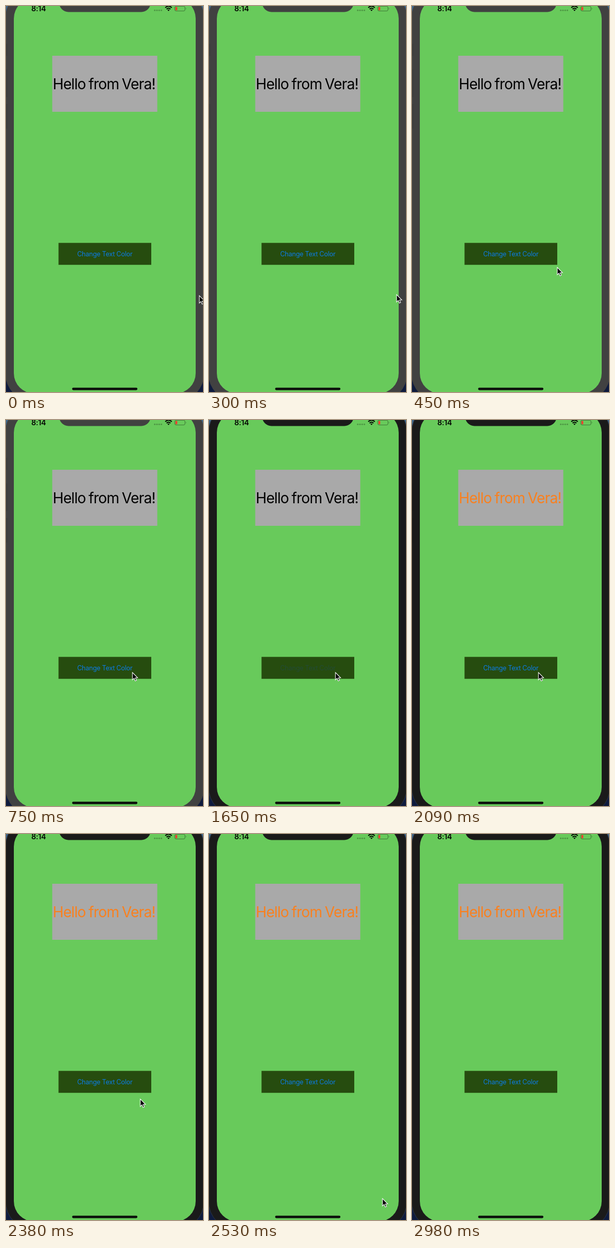
An HTML page that plays this animation: 377x737 px, repeating every 3.43 s.

```html
<!DOCTYPE html>
<html lang="en">
<head>
<meta charset="utf-8">
<title>Change text color</title>
<style>
html, body { margin: 0; width: 100%; height: 100%; overflow: hidden; }
svg { display: block; width: 377px; height: 737px; }
text { font-family: Inter, "Liberation Sans", sans-serif; }
#label { font-size: 28px; letter-spacing: -0.9px; word-spacing: -1.5px; }
#action { font-size: 12.5px; letter-spacing: -0.25px; }
#clock { font-size: 14px; font-weight: 600; letter-spacing: -0.2px; }
</style>
</head>
<body>
<svg viewBox="0 0 377 737">
  <defs>
    <linearGradient id="desk" x1="0" y1="0" x2="0" y2="1">
      <stop offset="0" stop-color="#41698c"/>
      <stop offset="0.05" stop-color="#24426a"/>
      <stop offset="1" stop-color="#0e1a3d"/>
    </linearGradient>
  </defs>
  <rect width="377" height="737" fill="url(#desk)"/>
  <rect id="bezel" x="-1" y="-31" width="380" height="787" rx="55"/>
  <path d="M1.5 72V95M1.5 121V174M1.5 187V234" stroke="#000" stroke-opacity="0.15"/>
  <rect x="15" y="-15" width="348" height="755" rx="39" fill="#68ca5b"/>
  <path id="notch" d="M101.500 -7A18 18.500 0 0 0 119.500 11.500H259A18 18.500 0 0 0 277 -7Z"/>

  <text id="clock" x="48.500" y="10">8:14</text>
  <g fill="#000" fill-opacity="0.26">
    <circle cx="284.700" cy="8.300" r="1.500"/>
    <circle cx="288.900" cy="8.300" r="1.500"/>
    <circle cx="293.100" cy="8.300" r="1.500"/>
    <circle cx="297.300" cy="8.300" r="1.500"/>
  </g>
  <g fill="none" stroke="#000" stroke-width="2">
    <path d="M304.800 3.200Q311 -2.600 317.200 3.200M307.300 5.900Q311 2.500 314.700 5.900"/>
    <path d="M309 7.600Q311 6 313 7.600L311 9.700Z" fill="#000" stroke="none"/>
  </g>
  <rect x="323" y="0.500" width="19.500" height="9" rx="2.500" fill="none" stroke="#000" stroke-opacity="0.4"/>
  <path d="M344 3.300Q345.600 5 344 6.700Z" fill="#000" fill-opacity="0.45"/>
  <rect x="324.300" y="1.800" width="3.400" height="6.400" rx="1" fill="#f03c2e"/>

  <rect x="88.500" y="95" width="201" height="107" fill="#a9a9a9"/>
  <text id="label" x="89.500" y="159">Hello from Vera!</text>
  <rect x="100.500" y="452.300" width="177.500" height="41.900" fill="#264c0f"/>
  <text id="action" x="189.100" y="477.800" text-anchor="middle">Change Text Color</text>
  <rect x="126.500" y="728.800" width="125" height="4.600" rx="2.300" fill="#0c100b"/>

  <g id="cursor">
    <path d="M1 1V15.200L4.200 12.200L6.300 17.200L8.700 16.200L6.600 11.300H11Z" fill="#000" fill-opacity="0.2" transform="translate(0.500 1.200)"/>
    <path d="M1 1V15.200L4.200 12.200L6.300 17.200L8.700 16.200L6.600 11.300H11Z" stroke="#fff" stroke-width="1.100"/>
  </g>
</svg>
<script>
const LOOP = 3430;
const PRESS = 1650, RELEASE = 1800;
const DIM = [35, 75, 53], BLUE = [12, 123, 228];

// [start time, x, y]: the pointer jumps between samples
const pointer = [
  [0, 369, 552], [300, 358, 550], [450, 277, 498], [600, 244, 482],
  [750, 241, 481], [2380, 256, 505], [2530, 331, 695], [2830, 324, 726],
  [2980, 400, 760]
];
// [start time, brightness of the button title]
const glow = [[0, 1], [PRESS, 0], [RELEASE, 0.35], [1940, 0.8], [2090, 1]];

const el = id => document.getElementById(id);
const [bezel, notch, label, action, cursor] =
  ["bezel", "notch", "label", "action", "cursor"].map(el);

const at = (steps, t) => steps.filter(s => s[0] <= t).pop().slice(1);
const mix = (a, b, k) => `rgb(${a.map((v, i) => Math.round(v + (b[i] - v) * k))})`;

function draw(t) {
  const shell = t < PRESS ? "#414141" : "#1a1a1a";
  bezel.setAttribute("fill", shell);
  bezel.setAttribute("stroke", t < PRESS ? "#414141" : "#2b3547");
  notch.setAttribute("fill", shell);
  label.setAttribute("fill", t < RELEASE ? "#000" : "#f9801f");
  action.setAttribute("fill", mix(DIM, BLUE, at(glow, t)[0]));
  cursor.setAttribute("transform", `translate(${at(pointer, t)})`);
}

const start = performance.now();
function tick() {
  draw((performance.now() - start) % LOOP);
  requestAnimationFrame(tick);
}
tick();
</script>
</body>
</html>
```
